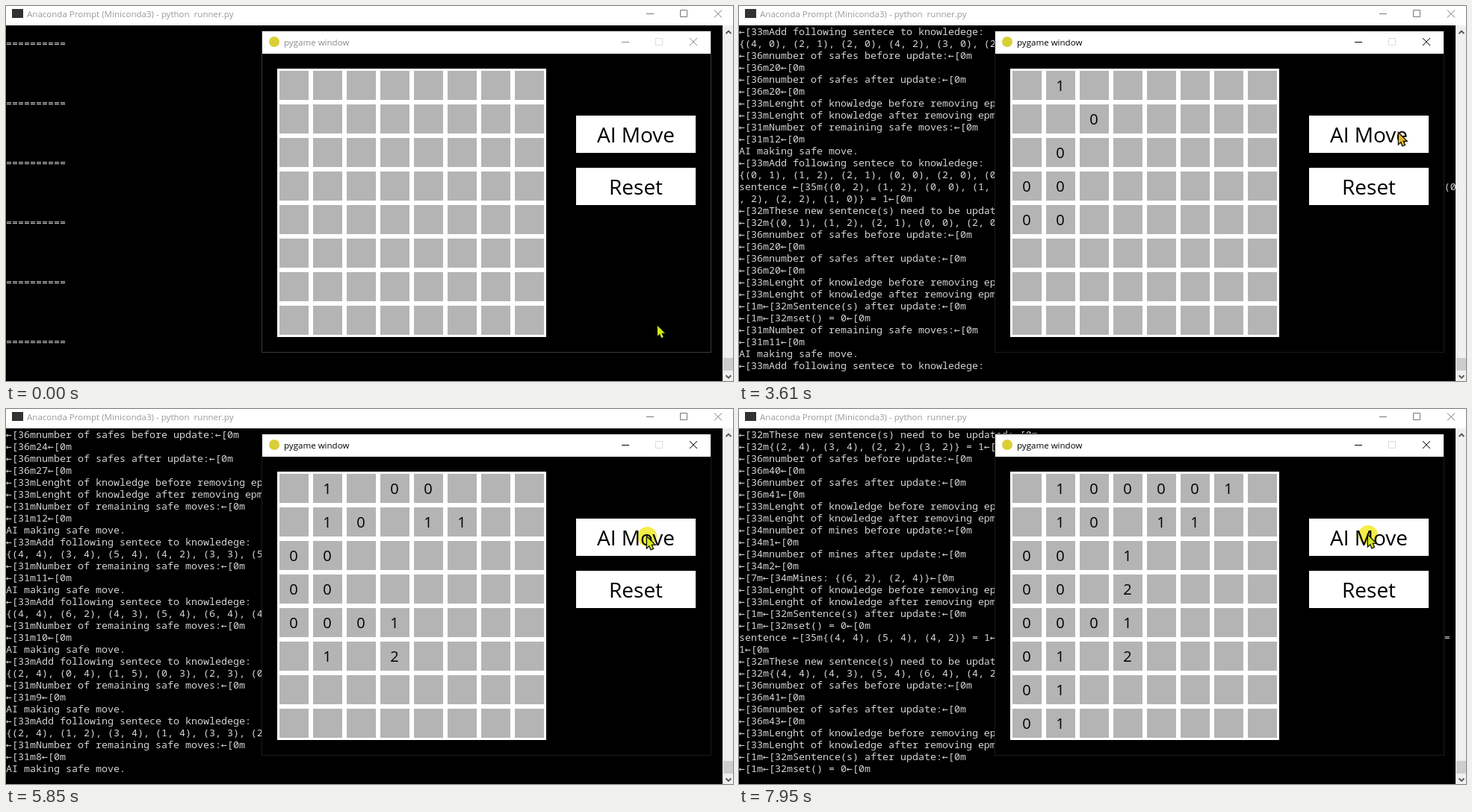
Write an HTML page that moves like this. It is 973 px wide and 503 px high and loops after 8000 ms.

```html
<!DOCTYPE html>
<html lang="en">
<head>
<meta charset="utf-8">
<title>Minesweeper solver</title>
<style>
html, body { margin: 0; width: 100%; height: 100%; overflow: hidden; background: #000; }
#stage { position: absolute; left: 0; top: 0; width: 973px; height: 503px; overflow: hidden; background: #000; }
#log {
  position: absolute; left: 0; top: 26px; width: 970px; height: 477px; margin: 0; overflow: hidden;
  color: #d4d4d4; font: 13.333px/16px "Noto Sans Mono", "DejaVu Sans Mono", monospace; font-variant-ligatures: none;
}
#log i { font: 13.29px/1 "DejaVu Sans Mono", monospace; }
svg { position: absolute; left: 0; top: 0; }
text { font-family: "Open Sans", "Noto Sans", sans-serif; white-space: pre; }
.title { font-size: 11.55px; }
.label { font-size: 28px; text-anchor: middle; }
.digit { font-size: 20px; text-anchor: middle; }
.icon { fill: none; stroke: currentColor; }
#halo { fill: #f4ec48; mix-blend-mode: multiply; }
#arrow { stroke: #141204; stroke-width: 2.6; paint-order: stroke; }
</style>
</head>
<body>
<div id="stage">
  <pre id="log"></pre>
  <svg width="973" height="503" viewBox="0 0 973 503">
    <rect width="973" height="26" fill="#fff"/>
    <rect x="8" y="4" width="15" height="12" fill="#30332f"/>
    <text class="title" x="28" y="15" fill="#999">Anaconda Prompt (Miniconda3) - python  runner.py</text>
    <path class="icon" color="#777" d="M857 10.5h10M902.5 5.5h9v9h-9zM948 5.5l10 10M958 5.5l-10 10"/>

    <rect x="959" y="26" width="14" height="477" fill="#f0f0f0"/>
    <rect x="960" y="472" width="13" height="17" fill="#cdcdcd"/>
    <path class="icon" color="#555" stroke-width="1.8" d="M963.5 37l3.5-3.5 3.5 3.5M963.5 495.5l3.5 3.5 3.5-3.5"/>

    <rect id="frame" x="342.5" y="33.5" width="601" height="431" fill="#000"/>
    <rect x="343" y="34" width="600" height="30" fill="#fff"/>
    <circle cx="359" cy="48" r="7" fill="#d9cf35"/>
    <g id="caption">
      <text class="title" x="372" y="53" fill="currentColor">pygame window</text>
      <path class="icon" d="M824 48.5h10M915 43l10 10M925 43l-10 10"/>
    </g>
    <path class="icon" color="#ddd" d="M869.5 43.5h9v9h-9z"/>

    <rect x="363" y="84" width="360" height="360" fill="#fff"/>
    <g id="board"></g>
    <rect x="763" y="147" width="160" height="50" fill="#fff"/>
    <rect x="763" y="217" width="160" height="50" fill="#fff"/>
    <text class="label" x="843" y="183">AI Move</text>
    <text class="label" x="843" y="253">Reset</text>

    <circle id="halo" r="13"/>
    <path id="arrow" d="M0 0V13.5L3 10.7 5.3 16 7.7 15 5.4 9.8H9.7Z"/>
  </svg>
</div>
<script>
const LOOP = 8000, COLS = 120, ROWS = 29, SIZE = 8;
const $ = id => document.getElementById(id);

// Each move: cell, mines nearby, newly safe cells, order in which neighbours are listed.
const moves = `30 0 6
40 0 2 gcehb
21 0 5 cgbdfe
12 0 5 afdchb
41 0 2
01 1 0 ehdgf
31 0 0 fbahdc
11 1 0 begafchd
03 0 2
04 0 2
15 1 0 fadchb
20 0 0 behcg
51 1 0 hagcdf
42 0 3
43 1 0 echdbf
53 2 0 cfbehagd
14 1 0 gbeafc
23 1 0 eahcgd
02 0 0
33 2 0
50 0 2
60 0 2 hbegc
71 1 0 ceabd
70 0 0
61 1 0
05 0 3
06 1 0
22 0 6`.split("\n").map(line => {
  const [cell, near, gain, order = ""] = line.split(" ");
  return { row: +cell[0], col: +cell[1], cell, near: +near, gain: +gain, order };
});

const esc = (code, s) => `←[${code}m${s}←[0m`;
const setText = cells => cells ? `{${cells.split(" ").map(c => `(${c[0]}, ${c[1]})`).join(", ")}}` : "set()";

function neighbours({ row, col, order }) {
  const letters = "abcdefgh";
  const sorted = [...order, ...[...letters].filter(c => !order.includes(c))];
  return sorted.map(c => {
    let i = letters.indexOf(c);
    if (i > 3) i++;
    return [row + Math.floor(i / 3) - 1, col + i % 3 - 1];
  }).filter(p => p.every(v => v >= 0 && v < SIZE)).map(p => p.join("")).join(" ");
}

const change = (code, what, a, b) => [
  esc(code, `number of ${what} before update:`), esc(code, a),
  esc(code, `number of ${what} after update:`), esc(code, b)];
const safes = (a, b) => change(36, "safes", a, b);
const mines = (a, b, cells) => [...change(34, "mines", a, b), "←[7m" + esc(34, "Mines: " + setText(cells))];
const knowledge = () => ["before", "after"].map((w, i) =>
  esc(33, `Lenght of knowledge ${w} removing epmty sentence: ${1 - i}`));
const pending = (part, whole, n) => [
  `sentence ${esc(35, setText(part) + " = 1")} is sub of${esc(35, `${setText(whole)} = ${n}`)}`,
  esc(32, "These new sentence(s) need to be updated:"), esc(32, `${setText(whole)} = ${n}`)];
const updated = (cells, n) => ["Sentence(s) after update:", `${setText(cells)} = ${n}`].map(s => "←[1m" + esc(32, s));

const listOf = cell => neighbours(moves.find(m => m.cell === cell));
const reduced = "44 43 54 64 42 63 52";
const deductions = {
  11: () => [...pending(listOf("01"), listOf("11"), 1), ...safes(20, 20), ...knowledge(), ...updated("", 0)],
  50: () => [...pending("62", listOf("53"), 2), ...mines(0, 1, "62"), ...knowledge(), ...updated(reduced, 1)],
  22: () => [...pending("24 34", "24 34 22 32", 1), ...safes(40, 41), ...knowledge(),
    ...mines(1, 2, "62 24"), ...knowledge(), ...updated("", 0),
    ...pending("44 54 42", reduced, 1), ...safes(41, 43), ...knowledge(), ...updated("", 0)]
};

let known = 0;
const wrap = s => s.match(new RegExp(`.{1,${COLS}}`, "g"));
const blocks = moves.map((m, i) => {
  const before = known;
  known += m.gain;
  const lines = ["←[33mAdd following sentece to knowledege:", `${setText(neighbours(m))} = ${m.near}←[0m`];
  if (!i) lines.unshift("No known safe moves, AI making random move.");
  if (!m.near) lines.push(...safes(before, known), ...knowledge());
  if (deductions[m.cell]) lines.push(...deductions[m.cell]());
  if (i < moves.length - 1)
    lines.push(esc(31, "Number of remaining safe moves:"), esc(31, known - i - 2), "AI making safe move.");
  return lines.flatMap(wrap);
});
const intro = Array.from({ length: ROWS }, (_, i) => i % 5 === 1 ? "=".repeat(10) : "");

function along(points, at) {
  let i = 1;
  while (i < points.length - 1 && points[i][0] < at) i++;
  const a = points[i - 1], b = points[i];
  const f = (at - a[0]) / (b[0] - a[0]);
  return a.slice(1).map((v, k) => v + (b[k + 1] - v) * f);
}

// Click number against time.
const pace = [[1, 1250], [4, 2330], [5, 2650], [9, 3590], [14, 4690], [19, 5870], [24, 6975], [29, 7975]];
const clicks = Array.from({ length: moves.length + 1 }, (_, i) => along(pace, i + 1)[0]);
const reveals = moves.map((m, i) => i < 4 ? clicks[i] + 60 : clicks[i + 1] + 30);

const path = [[0, 872, 429], [69, 872, 429], [70, 833, 209], [210, 833, 209], [390, 834, 172], [1190, 834, 172],
  [2520, 879, 173], [2650, 874, 172], [2990, 872, 172], [3610, 883, 171], [4650, 890, 173], [5300, 889, 172],
  [5850, 858, 172], [6400, 889, 173], [6940, 883, 175], [7400, 886, 173], [7950, 842, 170], [8000, 839, 170]];

function add(name, attrs) {
  const el = document.createElementNS("http://www.w3.org/2000/svg", name);
  for (const k in attrs) el.setAttribute(k, attrs[k]);
  return $("board").appendChild(el);
}
for (let i = 0; i < SIZE * SIZE; i++)
  add("rect", { x: 366 + i % SIZE * 45, y: 87 + Math.floor(i / SIZE) * 45, width: 39, height: 39, fill: "#b4b4b4" });
const digits = moves.map(m => {
  const el = add("text", { class: "digit", x: 385 + m.col * 45, y: 114 + m.row * 45 });
  el.textContent = m.near;
  return el;
});

let shown = "";
function draw(t) {
  const rows = [...intro];
  blocks.forEach((block, i) => {
    const span = (clicks[i + 1] - clicks[i]) * 0.75;
    const done = Math.min(1, Math.max(0, (t - clicks[i]) / span));
    rows.push(...block.slice(0, Math.floor(done * block.length)));
  });
  // A leading newline in a pre is kept when set through a text-safe replacement.
  const view = rows.slice(-ROWS).join("<br>").replaceAll("←", "<i>←</i>");
  if (view !== shown) $("log").innerHTML = shown = view;

  digits.forEach((el, i) => el.setAttribute("visibility", t >= reveals[i] ? "visible" : "hidden"));

  const active = t >= 1190;
  $("caption").setAttribute("color", active ? "#000" : "#8c8c8c");
  $("frame").setAttribute("stroke", active ? "#1c1c1c" : "#3a3a3a");

  const [x, y] = along(path, t).map(Math.round);
  $("arrow").setAttribute("transform", `translate(${x} ${y})`);
  $("arrow").setAttribute("fill", t > 1190 && t < 5000 ? "#e2b428" : "#d3ea1e");
  $("halo").setAttribute("transform", `translate(${x} ${y - 1})`);
  $("halo").setAttribute("visibility", clicks.some(c => t >= c - 30 && t < c + 15) ? "visible" : "hidden");
}

const start = performance.now();
function tick() {
  draw((performance.now() - start) % LOOP);
  requestAnimationFrame(tick);
}
tick();
</script>
</body>
</html>
```
